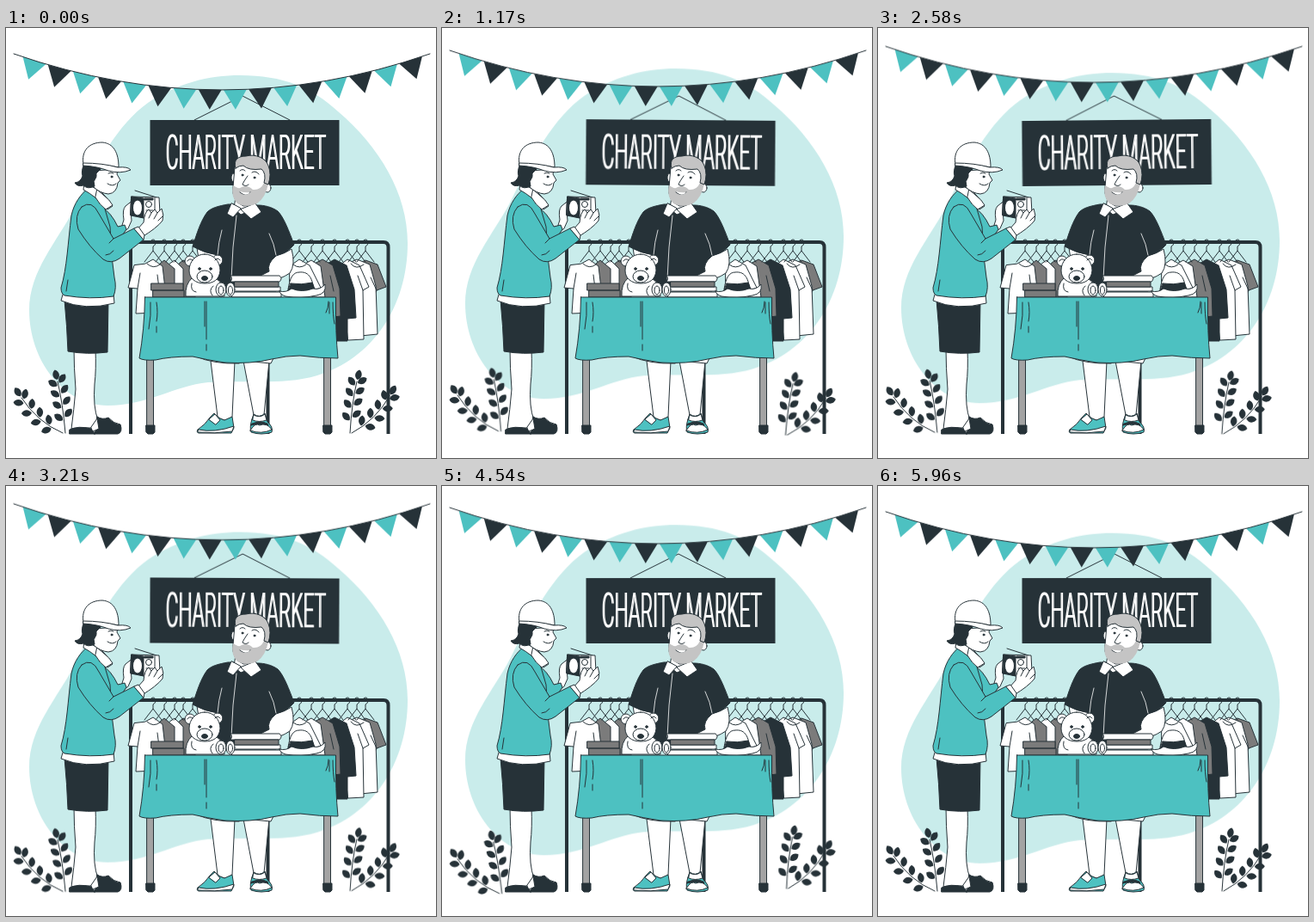
Animation of 500 by 500 pixels, one loop 6 s. Source, as an HTML page:

```html
<!DOCTYPE html>
<html lang="en">
<head>
<meta charset="utf-8">
<title>Charity market</title>
<style>
  html, body { margin: 0; width: 100%; height: 100%; overflow: hidden; background: #fff; }
  svg { display: block; width: 100vw; height: 100vh; }

  .ink { stroke: #263238; stroke-width: 1; stroke-linecap: round; stroke-linejoin: round; }
  .white { fill: #fff; }
  .teal { fill: #4dc1c1; }
  .dark { fill: #263238; }
  .gray { fill: #a3a3a3; }
  .slate { fill: #7b7b7b; }
  .hair { fill: #c4c4c4; }
  .pale { fill: #c9eceb; }
  .line { fill: none; }
  .thin { fill: none; stroke: #fff; stroke-width: .8; }
  .pole { fill: none; stroke: #263238; stroke-width: 4; }
  .sign-text { font: 300 56.3px Roboto, "Open Sans", sans-serif; fill: #fff; text-anchor: middle; }

  #blob { animation: float 3s linear infinite; }
  #bunting { animation: float 6s linear infinite; }
  #sign { transform-origin: 278px 131px; animation: sway 3s linear infinite; }
  #plants { transform-origin: 232px 434px; animation: sway 6s linear infinite; }

  @keyframes float { 50% { transform: translateY(-10px); } }
  @keyframes sway {
    0%, 100% { transform: rotate(0deg); }
    25% { transform: rotate(1deg); }
    75% { transform: rotate(-1deg); }
  }
</style>
</head>
<body>
<svg viewBox="0 0 500 500">
  <defs>
    <path id="leaf" d="M0 0C3 -5 9 -5 12 0C9 5 3 5 0 0Z"/>
    <path id="hanger" class="line ink" d="M-10 29L0 16L10 29M0 16V11C4 9 4 3 0 3Q-2 3 -3 5"/>
  </defs>

  <path id="blob" class="pale" d="M272 55C322 55 356 69 386 97C434 138 467 192 467 250C467 325 425 385 362 404C322 416 275 409 235 412C195 416 165 439 118 439C65 438 27 385 27 328C27 282 60 248 80 209C105 158 130 112 165 87C200 64 235 55 272 55Z"/>

  <g id="sign">
    <path class="line ink" d="M219 107L275 79L330 107"/>
    <rect class="dark" x="167.500" y="107" width="220" height="76"/>
    <g transform="translate(279 164) scale(.4 1)">
      <text class="sign-text" x="-1.500">CHARITY MARKET</text>
      <text class="sign-text" x="1.500" aria-hidden="true">CHARITY MARKET</text>
    </g>
  </g>

  <g id="bunting"></g>
  <g id="plants" class="dark"></g>

  <g id="rack">
    <path class="pole" d="M145 472V253Q145 249 149 249H439Q444.500 249 444.500 255V472M304.500 385V472"/>
    <g class="ink">
      <path class="slate" d="M196 278L206 270L220 276V313H196Z"/>
      <path class="white" d="M186 277L196 270L206 280V313H184Z"/>
      <path class="slate" d="M174 278L184 270L196 280V313H174Z"/>
      <path class="white" d="M162 274L171 269L182 277L185 303H178L176 331L151 332L153 303L142 302L149 276Z"/>
      <path class="line" d="M153 303L156 285M178 303L176 287M164 274Q171 281 179 275"/>
      <path class="slate" d="M405 276L418 270L432 275L442 301L431 305L428 313H407Z"/>
      <path class="white" d="M395 275L408 269L423 275L430 300L432 356L412 358L400 300Z"/>
      <path class="white" d="M388 276L397 269L411 276L422 301L415 305L416 362L398 363Z"/>
      <path class="dark" d="M370 276L382 269L396 276L405 304L407 337L397 338V364H384V310Z"/>
      <path class="slate" d="M355 276L368 269L380 276L388 303L389 335L381 336V320H356Z"/>
      <path class="white" d="M344 276L355 270L366 277L371 313H345Z"/>
      <path class="white" d="M330 277L341 269L353 276L366 302L356 306V315H330Z"/>
      <path class="line" d="M356 306L350 288M381 306L377 288M415 305L409 288M334 275Q341 281 349 275M401 274Q407 282 416 275M424 290L431 305"/>
    </g>
    <g id="hangers"></g>
  </g>

  <g id="man" class="ink">
    <path class="white" d="M238 387L246 452Q254 460 263 452L266 387Z"/>
    <path class="white" d="M276 387L288 450Q294 456 300 450L306 387Z"/>
    <path class="white" d="M221 382Q242 391 271 390L276 387L308 390L312 382Z"/>
    <path class="teal" d="M223 467Q232 461 237 453L242 448Q248 455 254 456L263 452L265 465L262 471H224Q221 470 223 467Z"/>
    <path class="white" d="M236 455L243 449L249 456L244 461ZM224 467Q242 471 265 463L263 469Q243 472 223 470Z"/>
    <path class="teal" d="M286 455L288 449Q295 454 301 448L304 458Q311 464 309 470Q297 474 285 470Q283 464 286 455Z"/>
    <path class="white" d="M288 450Q295 454 301 449L303 456Q294 459 287 456ZM284 468Q290 458 295 462Q303 458 309 467Q297 473 284 468Z"/>
    <path class="dark" d="M286 460Q296 456 304 460L305 462Q295 459 285 462Z"/>

    <path class="white" d="M222 253L246 260L244 285L227 286Z"/>
    <path class="dark" d="M258 205C247 207 239 209 234 214C226 225 222 239 217 254Q231 262 246 264L243 306H314L314 266Q326 262 335 252C329 236 323 220 316 213C309 208 300 206 293 206Z"/>
    <path class="white" d="M314 265Q325 262 332 257Q337 275 330 285Q320 292 302 296H284L292 290L306 283Q303 274 314 265Z"/>
    <path class="thin" d="M246 264Q247 249 251 235M314 264Q312 251 306 239M268 218Q263 255 262 292"/>
    <path class="white" d="M267 196L265 210L273 217L288 211L291 195Z"/>
    <path class="white" d="M262 204L257 216L264 220L273 210ZM290 204L297 214L285 222L273 211Z"/>
    <ellipse class="white" cx="265" cy="174" rx="3" ry="5"/>
    <ellipse class="white" cx="304" cy="186" rx="4" ry="5"/>
    <path class="white" d="M266 162Q268 150 284 150Q303 152 306 170L301 191Q292 207 276 207Q262 201 264 185Z"/>
    <path class="hair" stroke="none" d="M264 183Q271 188 274 185Q281 182 287 188Q296 189 300 180L305 181Q302 197 292 204Q280 210 269 204Q261 196 264 183Z"/>
    <path class="hair" d="M267 163C264 153 270 149 279 149C290 146 302 151 305 160Q309 170 305 182L300 180Q303 169 297 164Q282 166 276 160Q271 160 267 163Z"/>
    <path class="line" d="M272 166Q275 163 278 166M286 168Q290 165 294 170M281 172Q276 179 275 182Q279 185 282 182M272 191Q278 196 284 191"/>
    <path class="white" stroke="none" d="M272 190Q278 192 284 191Q279 197 272 190Z"/>
    <circle class="dark" cx="275" cy="171" r="1"/>
    <circle class="dark" cx="289" cy="174" r="1"/>
  </g>

  <g id="goods" class="ink">
    <path class="slate" d="M169 297H206V305H169ZM171 305H207V313H171Z"/>
    <path class="white" d="M261 288H318Q322 291 318 295H261Q264 291 261 288ZM265 301H319V306H265ZM263 307H320V313H263Z"/>
    <path class="slate" d="M266 295H317V301H266Z"/>
    <path class="white" d="M328 304C330 290 334 284 341 284C351 283 356 289 358 304Z"/>
    <path class="dark" d="M331 297Q344 299 356 296L360 306H328Z"/>
    <path class="white" d="M318 306Q326 308 332 303Q344 308 357 303Q365 305 371 298Q373 309 361 311Q343 315 325 312Q319 310 318 306Z"/>
    <path class="white" d="M216 291Q208 298 209 312H254Q254 297 244 291Z"/>
    <circle class="white" cx="214" cy="271" r="6"/>
    <circle class="white" cx="246" cy="270" r="6"/>
    <path class="white" d="M231 263C242 263 249 272 249 282C248 293 241 297 231 297C220 297 213 291 213 282C213 271 221 263 231 263Z"/>
    <ellipse class="white" cx="231" cy="289" rx="9" ry="7"/>
    <ellipse class="dark" cx="231" cy="291" rx="3.500" ry="2.500"/>
    <circle class="dark" cx="225" cy="280" r="1.300"/>
    <circle class="dark" cx="238" cy="280" r="1.300"/>
    <path class="line" d="M211 271Q213 267 217 270M243 270Q246 266 249 270M216 297Q214 306 221 307M241 300Q235 305 240 311"/>
    <ellipse class="white" cx="250" cy="304" rx="6" ry="8"/>
    <ellipse class="white" cx="261" cy="304" rx="5" ry="8"/>
    <ellipse class="line" cx="250" cy="305" rx="3" ry="5"/>
    <ellipse class="line" cx="261" cy="305" rx="2.500" ry="5"/>
  </g>

  <g id="table" class="ink">
    <path class="gray" d="M164 380H171.500V463H164ZM370 380H377.500V463H370Z"/>
    <path class="dark" d="M163 462H173V470L171 472H165L163 470ZM369 462H379V470L377 472H371L369 470Z"/>
    <path class="teal" d="M161.500 313H383.500Q383 355 386 384Q365 384 342 381Q326 381 309 385Q285 391 254 389Q234 386 217 382Q190 382 174 386Q160 387 155 384Q161 350 161.500 313Z"/>
    <path class="line" d="M168 319Q169 334 166 350M175 319Q177 331 175 341M175 347V354M231 318V347M233 318V362M233 368V375M372 331Q375 326 375 318M380 319Q380 334 382 344M376 319V332"/>
  </g>

  <g id="woman" class="ink">
    <path class="white" d="M104 373Q105 398 103 414Q101 441 107 456L99 465Q87 464 76 466Q79 444 81 420Q79 395 79 373Z"/>
    <path class="dark" d="M74 467Q84 462 99 466L104 472H74Z"/>
    <path class="dark" d="M106 452Q112 456 119 453Q125 460 133 461Q136 470 130 472H102L105 467Z"/>
    <path class="white" d="M99 464L106 454L108 466L101 469Z"/>
    <path class="dark" d="M68 316Q71 347 72 376Q94 380 118 377L119 316Z"/>
    <path class="white" d="M66 310L64 317Q92 329 126 320L125 309Z"/>

    <path class="white" d="M132 239L137 223Q135 211 139 207L148 200L151 205L145 212L146 224L142 233Z"/>
    <path class="teal" d="M112 209Q122 214 130 231L138 229L140 234L128 252L108 248Z"/>
    <path class="teal" d="M95 187C87 193 79 204 76 218C72 249 71 279 64 302Q64 309 68 311Q98 316 125 312Q129 302 126 290L123 266L121 231L114 207Q106 192 95 187Z"/>
    <path class="teal" d="M88 208Q79 218 84 234Q97 255 113 269Q122 275 132 268L160 246Q157 236 149 233L125 245L108 216Q100 199 88 208Z"/>
    <path class="line" d="M72 293L70 306M125 245L120 250M116 264Q121 264 125 259"/>
    <path class="white" d="M91 180L90 188Q105 196 118 211L124 207Q117 196 110 190Z"/>
    <path class="white" d="M106 188L113 194Q121 200 124 206L116 211Q109 206 104 197Z"/>
    <path class="white" d="M102 166L130 164L129 170L133 177L130 180Q129 192 119 193Q109 192 102 185Z"/>
    <path class="dark" d="M91 157Q87 167 89 172Q87 179 80 180Q83 185 90 183Q95 188 103 184L102 178Q106 174 105 169L111 163L110 156Z"/>
    <path class="line" d="M119 169Q122 167 125 169M118 181Q124 185 128 181M103 177Q101 172 105 172"/>
    <circle class="dark" cx="123" cy="173" r="1"/>
    <path class="white" d="M90 159C87 142 97 133 112 133C125 134 131 145 131 162Q112 158 90 159Z"/>
    <path class="white" d="M90 157Q112 157 130 162Q142 161 145 165Q133 170 119 166Q107 161 90 160Z"/>

    <g id="radio">
      <path class="line" d="M150 189L175 197"/>
      <path class="white" d="M146 196L178 197L179 216L161 221L145 217Z"/>
      <path class="dark" d="M146 196L160 198L160 221L145 218Z"/>
      <ellipse class="white" cx="153" cy="209" rx="5.500" ry="9"/>
      <path class="dark" d="M161 198H171V200H161Z"/>
      <circle class="white" cx="166" cy="205" r="3.500"/>
      <path class="line" d="M173 198V215M163 212H171"/>
    </g>
    <path class="white" d="M152 235L160 226Q161 214 166 211L169 215L173 211L176 215L181 210Q184 217 182 224Q175 233 158 243Z"/>
    <path class="line" d="M169 215L166 221M176 215L172 222M182 219L177 224"/>
    <path class="white" d="M149 233L154 231L161 241L160 246Z"/>
  </g>
</svg>

<script>
  const el = id => document.getElementById(id);

  // Pennants hang square to the parabola of the string.
  const sag = x => 72 - 42 * ((x - 251) / 242) ** 2;
  const slope = x => -84 * (x - 251) / 242 ** 2;

  function pennant(i) {
    const x = 33 + i * 29.17, half = 13.4;
    const len = Math.hypot(1, slope(x));
    const tip = [x - slope(x) / len * 23, sag(x) + 23 / len];
    const tops = [x - half, x + half].map(p => [p, sag(p)]);
    return `<path class="${i % 2 ? "dark" : "teal"}" d="M${tops[0]}L${tops[1]}L${tip}Z"/>`;
  }

  el("bunting").innerHTML =
    Array.from({ length: 16 }, (_, i) => pennant(i)).join("") +
    '<path class="line ink" d="M9 30Q251 114 493 30"/>';

  // A stem along a quadratic curve with alternating leaves and one at the tip.
  function branch(a, b, c, count) {
    const leaf = (t, turn) => {
      const u = 1 - t;
      const at = k => u * u * a[k] + 2 * u * t * b[k] + t * t * c[k];
      const dir = k => u * (b[k] - a[k]) + t * (c[k] - b[k]);
      const deg = Math.atan2(dir(1), dir(0)) * 180 / Math.PI + turn;
      return `<use href="#leaf" transform="translate(${at(0)} ${at(1)}) rotate(${deg}) translate(2 0)"/>`;
    };
    let out = `<path class="line ink" d="M${a}Q${b} ${c}"/>` + leaf(1, 0);
    for (let i = 0; i < count; i++) {
      const t = .2 + .68 * i / (count - 1);
      out += leaf(t, -48) + leaf(t + .06, 48);
    }
    return out;
  }

  el("plants").innerHTML =
    branch([69, 471], [66, 436], [60, 411], 4) +
    branch([66, 471], [36, 458], [18, 430], 4) +
    branch([400, 471], [402, 436], [408, 411], 4) +
    branch([402, 471], [430, 456], [446, 428], 4);

  el("hangers").innerHTML = [171, 184, 196, 206, 217, 341, 355, 368, 382, 397, 408, 418]
    .map(x => `<use href="#hanger" x="${x}" y="243"/>`).join("");
</script>
</body>
</html>
```
